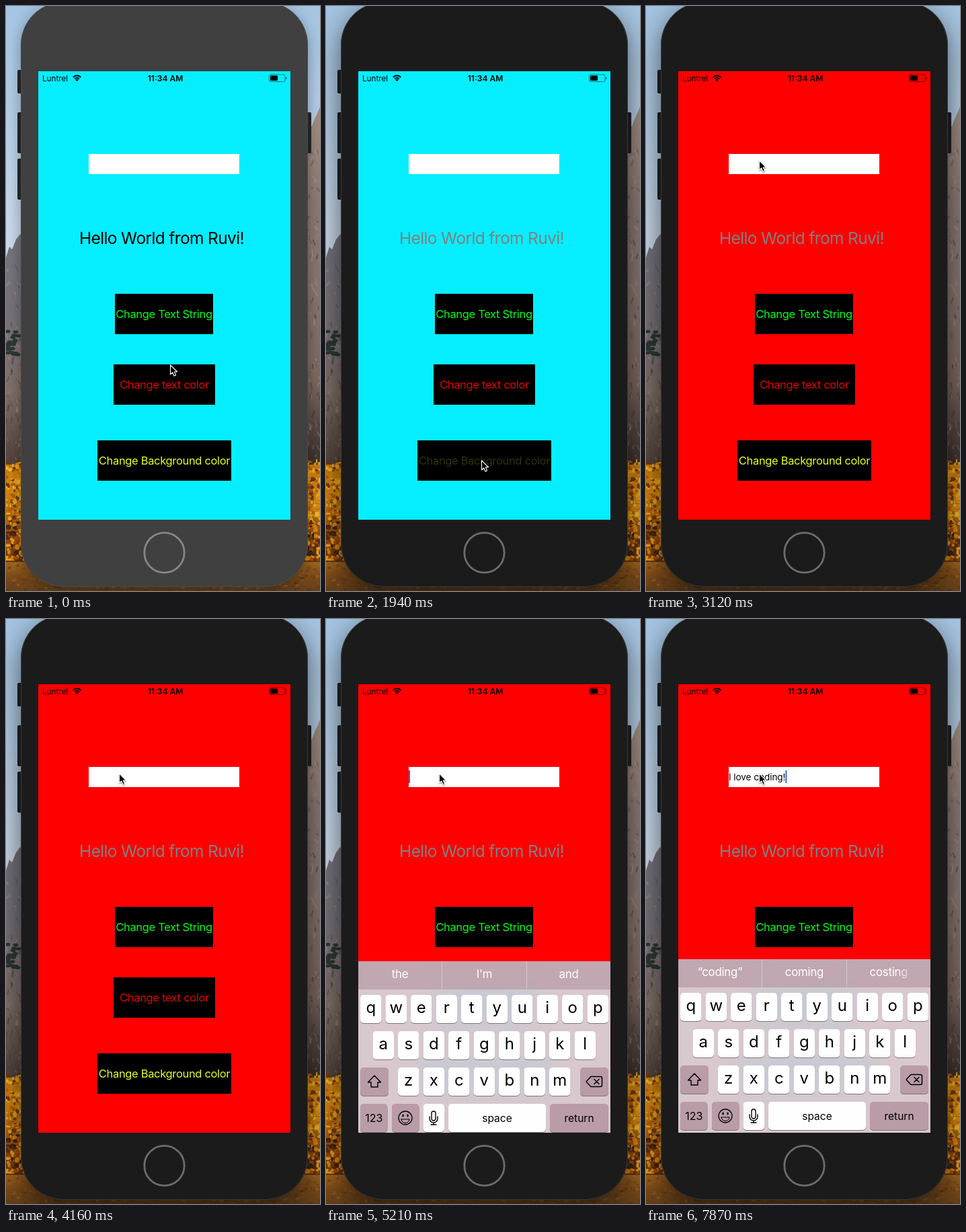
Recreate the animation shown at these times as an HTML page with a canvas. Size 467x870 px, loop 8000 ms.

```html
<!DOCTYPE html>
<html lang="en">
<head>
<meta charset="utf-8">
<title>Phone simulator</title>
<style>
  html, body { margin: 0; width: 100%; height: 100%; overflow: hidden; background: #a5c5e2; }
  canvas { display: block; width: 467px; height: 870px; }
</style>
</head>
<body>
<canvas id="stage"></canvas>
<script>
const W = 467, H = 870, LOOP = 8000;
const ratio = window.devicePixelRatio || 1;
const FONT = 'Inter, "Open Sans", sans-serif';

// Step tables: [time, ...values]
const CURSOR = [
  [0, 244, 533], [150, 244, 558], [300, 244, 576], [1340, 237, 645], [1490, 231, 675],
  [2380, 228, 630], [2530, 218, 520], [2675, 206, 395], [2820, 196, 300],
  [2970, 183, 252], [3120, 168, 229]
];
const TEXT_PRESS = [[0, 1], [740, .2], [890, .6], [1040, 1]];
const BACK_PRESS = [[0, 1], [1940, .2], [2090, .6], [2235, 1]];
const CARET = [[0, 0], [3720, 1], [4010, .5], [4160, 0], [4460, 1]];
const KEYBOARD = [[0, 300, 300], [4910, 162, 149], [5060, 22, 21], [5210, 3, 3], [5360, 0, 0]];
const TYPED = [
  [0, ''], [5510, 'I'], [5810, 'I '], [5960, 'I l'], [6110, 'I lo'], [6250, 'I love'],
  [6400, 'I love '], [6700, 'I love c'], [6850, 'I love co'], [6990, 'I love cod'],
  [7140, 'I love codi'], [7290, 'I love codin'], [7430, 'I love coding'], [7870, 'I love coding!']
];
const HINTS = [
  [0, 'the', "I'm", 'and'], [5810, '“i”', 'I', "I'm"], [6700, 'love', 'the', 'it'],
  [6990, '“c”', 'can', 'come'], [7290, '“cod”', 'code', 'coding'],
  [7580, '“codi”', 'coding', 'coming'], [7730, '“codin”', 'coding', 'coming'],
  [7870, '“coding”', 'coming', 'costing']
];

function at(table, t) {
  let row = table[0];
  for (const r of table) if (r[0] <= t) row = r;
  return row.slice(1);
}

function seeded(seed) {
  return () => (seed = (seed * 16807) % 2147483647) / 2147483647;
}

function makeCanvas(el) {
  el.width = W * ratio;
  el.height = H * ratio;
  const c = el.getContext('2d');
  c.scale(ratio, ratio);
  return c;
}

const stage = document.getElementById('stage');
const ctx = makeCanvas(stage);
const scenery = document.createElement('canvas');
paintScenery(makeCanvas(scenery));

function vertical(c, y0, y1, ...colors) {
  const g = c.createLinearGradient(0, y0, 0, y1);
  colors.forEach((color, i) => g.addColorStop(i / (colors.length - 1), color));
  return g;
}

function paintScenery(c) {
  const rnd = seeded(77);
  const pick = list => list[Math.floor(rnd() * list.length)];
  const poly = (fill, points) => {
    c.fillStyle = fill;
    c.beginPath();
    points.forEach(([x, y]) => c.lineTo(x, y));
    c.fill();
  };
  // Only the margins around the phone are visible.
  const edgeX = () => rnd() < .5 ? rnd() * 50 : W - rnd() * 50;
  c.fillStyle = vertical(c, 0, 350, '#a4c5e3', '#b7cfe8', '#ccdaea');
  c.fillRect(0, 0, W, H);
  poly(vertical(c, 340, 690, '#74757d', '#77737a', '#806f68', '#503e39'),
    [[0, 374], [5, 358], [9, 362], [15, 347], [24, 336], [230, 300], [230, 830], [0, 830]]);
  poly(vertical(c, 160, 690, '#a28e82', '#8d7c76', '#87766f', '#7d6961', '#352b28'),
    [[230, 300], [449, 192], [455, 178], [460, 166], [467, 150], [467, 830], [230, 830]]);
  for (let i = 0; i < 420; i++) {
    const x = edgeX(), y = 205 + rnd() * 475;
    if (x < 233 && y < 378) continue;
    c.strokeStyle = pick(['#4a464b55', '#c0a99a55', '#35303366', '#a2948f55']);
    c.lineWidth = 1 + rnd() * 2;
    c.beginPath();
    c.moveTo(x, y);
    c.lineTo(x + rnd() * 9 - 4, y + 3 + rnd() * 8);
    c.stroke();
  }
  c.fillStyle = '#2e3835';
  for (let i = 0; i < 22; i++) {
    c.beginPath();
    c.ellipse(rnd() * 20, 484 + rnd() * 36, 4, 2.5, 0, 0, 7);
    c.fill();
  }
  c.fillStyle = vertical(c, 676, 830, '#c8790f', '#cf850f', '#9a5412', '#5d3010');
  c.fillRect(0, 682, W, 148);
  for (let i = 0; i < 750; i++) {
    const y = 677 + rnd() * 148;
    c.fillStyle = pick(y < 765
      ? ['#e9a616', '#d98609', '#f0b92a', '#b8590f', '#713a12', '#e09410']
      : ['#d98609', '#a94d10', '#5a2e14', '#3d2416', '#e5a01a']);
    c.beginPath();
    c.ellipse(edgeX(), y, 1 + rnd() * 3, 1 + rnd() * 3, 0, 0, 7);
    c.fill();
  }
  c.fillStyle = vertical(c, 826, H, '#a4651c', '#7c4b19', '#65401b');
  c.fillRect(0, 826, W, 44);
  for (let i = 0; i < 420; i++) {
    c.fillStyle = pick(['#4a2f1955', '#b8782855', '#3a291a55']);
    c.fillRect(rnd() * W, 828 + rnd() * 42, 2 + rnd() * 4, 1 + rnd() * 3);
  }
  c.fillStyle = '#4c2c14';
  c.fillRect(0, 825, W, 1.5);
}

function rect(x, y, w, h, fill) {
  ctx.fillStyle = fill;
  ctx.fillRect(x, y, w, h);
}

function round(x, y, w, h, r, fill) {
  ctx.fillStyle = fill;
  ctx.beginPath();
  ctx.roundRect(x, y, w, h, r);
  ctx.fill();
}

function label(text, x, y, size, fill, { align = 'center', weight = 400, track = 0 } = {}) {
  ctx.font = `${weight} ${size}px ${FONT}`;
  ctx.letterSpacing = `${track * size}px`;
  ctx.textAlign = align;
  ctx.fillStyle = fill;
  ctx.fillText(text, x, y);
}

function line(path, color = '#000', width = 1.5, x = 0, y = 0, fill) {
  ctx.save();
  ctx.translate(x, y);
  ctx.lineWidth = width;
  ctx.lineJoin = ctx.lineCap = 'round';
  const p = new Path2D(path);
  if (fill) { ctx.fillStyle = fill; ctx.fill(p); }
  ctx.strokeStyle = color;
  ctx.stroke(p);
  ctx.restore();
}

function drawPhone(active) {
  for (const [x, y, h] of [[17, 95, 35], [17, 158, 61], [17, 227, 61], [444, 158, 61]])
    round(x, y, 10, h, 2, active ? '#202124' : '#27282a');
  ctx.save();
  ctx.shadowColor = active ? 'rgba(0,0,0,.6)' : 'rgba(0,0,0,.35)';
  ctx.shadowBlur = (active ? 44 : 22) * ratio;
  ctx.shadowOffsetY = (active ? 14 : 6) * ratio;
  round(22, -6, 427, 870, 64, active ? '#1b1b1b' : '#404040');
  ctx.restore();
  ctx.beginPath();
  ctx.roundRect(22.5, -5.5, 426, 869, 63.5);
  ctx.lineWidth = 1;
  ctx.strokeStyle = active ? '#3c3c3c' : '#4b4b4b';
  ctx.stroke();
  ctx.beginPath();
  ctx.arc(235.5, 813, 29.7, 0, 7);
  ctx.lineWidth = 2.8;
  ctx.strokeStyle = active ? '#6c6c6c' : '#868686';
  ctx.stroke();
}

function drawStatus() {
  label('Luntrel', 54, 111.5, 11.7, '#000', { align: 'left' });
  label('11:34 AM', 237, 111.5, 12, '#000', { weight: 600 });
  ctx.strokeStyle = '#000';
  ctx.lineCap = 'butt';
  ctx.lineWidth = 2;
  for (const r of [4.6, 8]) {
    ctx.beginPath();
    ctx.arc(105.5, 111.5, r, -Math.PI * .76, -Math.PI * .24);
    ctx.stroke();
  }
  ctx.fillStyle = '#000';
  ctx.beginPath();
  ctx.moveTo(105.5, 112);
  ctx.arc(105.5, 112, 3, -Math.PI * .76, -Math.PI * .24);
  ctx.fill();
  ctx.beginPath();
  ctx.roundRect(391.5, 102, 23.5, 10.5, 2.5);
  ctx.lineWidth = 1;
  ctx.strokeStyle = 'rgba(0,0,0,.5)';
  ctx.stroke();
  round(393, 103.5, 11, 7.5, 1, '#000');
  round(416, 105.5, 1.5, 3.5, 1, 'rgba(0,0,0,.5)');
}

function button(x, y, w, text, rgb, alpha) {
  rect(x, y, w, 60, '#000');
  label(text, x + w / 2, y + 36, 16.5, `rgba(${rgb},${alpha})`, { track: -.02 });
}

function drawField(t) {
  rect(123, 220, 224, 30, '#fff');
  const [text] = at(TYPED, t);
  label(text, 123, 239.5, 13.6, '#000', { align: 'left', track: -.006 });
  const [alpha] = at(CARET, t);
  rect(123 + ctx.measureText(text).width, 225, 2, 19, `rgba(58,100,220,${alpha})`);
}

function key(x, y, w, text, { size = 24, plain = true } = {}) {
  round(x, y + 1, w, 42, 5, 'rgba(110,95,105,.8)');
  round(x, y, w, 42, 5, plain ? '#fefefe' : '#b99ca7');
  if (text) label(text, x + w / 2, y + (size > 20 ? 27 : 26.5), size, '#000');
}

function drawHints(t, top) {
  const fade = ctx.createLinearGradient(372, 0, 394, 0);
  fade.addColorStop(0, '#fff');
  fade.addColorStop(1, 'rgba(255,255,255,.35)');
  const chosen = t >= 5810 && t < 6700;
  const show = (words, alpha) => {
    ctx.globalAlpha = alpha;
    words.forEach((word, i) => label(word, 110 + i * 125.5, top + 25, 16.8,
      chosen && i === 1 ? '#2f73d2' : fade, { track: -.012 }));
    ctx.globalAlpha = 1;
  };
  if (chosen) rect(172, top, 127, 42, '#ebedef');
  else for (const x of [172, 298]) rect(x, top, 1, 42, 'rgba(255,255,255,.35)');
  if (t < 5060) {
    show(['“coding”', 'coming', 'costing'], .6);
    show(['the', "I'm", 'and'], .8);
  } else show(at(HINTS, t), t >= 5810 && t < 5960 ? .7 : 1);
}

function drawKeyboard(t) {
  const [rise, drop] = at(KEYBOARD, t);
  const top = 506 + rise, bar = 548 + drop;
  ctx.save();
  ctx.beginPath();
  ctx.rect(48, top, 375, 764 - top);
  ctx.clip();
  rect(48, top, 375, 764 - top, '#d9c8ce');
  ctx.filter = 'blur(16px)';
  rect(160, 545, 151, 60, '#c4cad2');
  rect(136, 646, 199, 60, '#c6cad2');
  ctx.filter = 'none';
  ctx.save();
  ctx.beginPath();
  ctx.rect(48, top, 375, bar - top);
  ctx.clip();
  rect(48, top, 375, 42, 'rgba(178,146,159,.6)');
  drawHints(t, top);
  ctx.restore();

  const y = row => 556 + drop + row * 54;
  [['qwertyuiop', 51], ['asdfghjkl', 69.5], ['zxcvbnm', 107]].forEach(([letters, x], row) =>
    [...letters].forEach((ch, i) => key(x + i * 37.5, y(row), 31.5, ch)));
  const gray = { plain: false, size: 16 };
  key(51, y(2), 42, '', gray);
  key(378, y(2), 42, '', gray);
  key(51, y(3), 40.5, '123', gray);
  key(98, y(3), 40.5, '', gray);
  key(144.5, y(3), 31.5, '');
  key(182, y(3), 145, 'space', { size: 15.5 });
  key(333, y(3), 87, 'return', { plain: false, size: 15.5 });
  line('M0-9 L9.5 1 H5 V8 H-5 V1 H-9.5Z', '#000', 1.5, 72, y(2) + 21);
  line('M-12 0 L-5-7.5 H9 Q11.5-7.5 11.5-5 V5 Q11.5 7.5 9 7.5 H-5Z M0-3.5 L7 3.5 M7-3.5 L0 3.5',
    '#000', 1.5, 399, y(2) + 21);
  line('M-10 0 A10 10 0 1 1 10 0 A10 10 0 1 1 -10 0', '#000', 1.3, 118, y(3) + 21);
  line('M-6 2 H6 A6 5.5 0 0 1 -6 2Z', '#000', 1, 118, y(3) + 21);
  line('M-3.5-4.5 V-2.5 M3.5-4.5 V-2.5', '#000', 2.2, 118, y(3) + 21);
  line('M-3-7 A3 3 0 0 1 3-7 V1 A3 3 0 0 1 -3 1Z M-6-2 V1 A6 6 0 0 0 6 1 V-2 M0 7 V10 M-4 10 H4',
    '#000', 1.4, 160, y(3) + 21);
  ctx.restore();
}

function drawCursor(t) {
  const [x, y] = at(CURSOR, t);
  ctx.save();
  ctx.shadowColor = 'rgba(0,0,0,.45)';
  ctx.shadowBlur = 2 * ratio;
  ctx.shadowOffsetY = ratio;
  line('M.5 .8 V15 L3.7 12 L6 17.2 L8.6 16 L6.3 11 H10.6Z', '#fff', 1.1, x, y, '#000');
  ctx.restore();
}

function draw(t) {
  const active = t >= 590;
  ctx.drawImage(scenery, 0, 0, W, H);
  drawPhone(active);
  rect(48, 97, 375, 667, t >= 2090 ? '#f00' : '#05eeff');
  drawStatus();
  drawField(t);
  label('Hello World from Ruvi!', 109, 353.5, 24.5, t >= 890 ? '#808080' : '#000',
    { align: 'left', track: -.026 });
  button(162, 428, 146, 'Change Text String', '0,255,20', 1);
  button(160, 533, 151, 'Change text color', '228,0,0', at(TEXT_PRESS, t)[0]);
  button(136, 646, 199, 'Change Background color', '230,255,20', at(BACK_PRESS, t)[0]);
  if (t >= 4910) drawKeyboard(t);
  drawCursor(t);
}

const start = performance.now();
function tick() {
  draw((performance.now() - start) % LOOP);
  requestAnimationFrame(tick);
}
tick();
</script>
</body>
</html>
```
